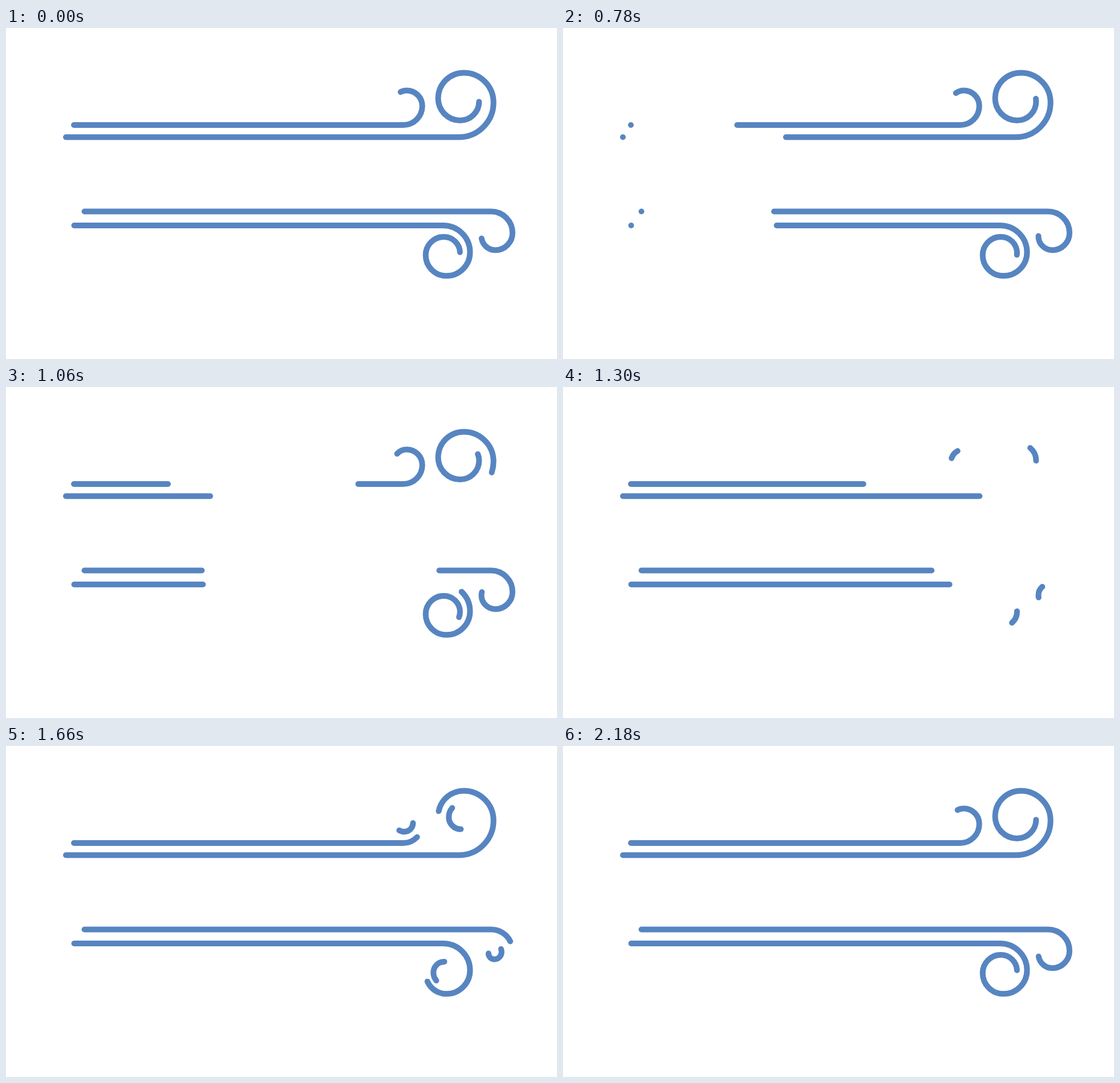
Recreate the animation shown at these times as an HTML page. Size 966 px wide and 580 px high, loop 3.58 s.

```html
<!DOCTYPE html>
<html>
<head>
<meta charset="utf-8">
<title>Wind</title>
<style>
  html, body { margin: 0; width: 100%; height: 100%; overflow: hidden; background: #fff; }
  svg { display: block; width: 966px; height: 580px; }
  path { fill: none; stroke: #5785c1; stroke-width: 10; stroke-linecap: round; }
</style>
</head>
<body>
<svg viewBox="0 0 966 580"></svg>
<script>
const LOOP = 3580, START = 500, END = 2180, STEP = 40;
const REST = 0.9; // the part of each path that is visible at rest
const svg = document.querySelector('svg');

// A straight line that curls up (side -1) or down (side 1) in ever smaller quarter circles.
function addGust({ x, y, curlX, side, radius, shrink, quarters }) {
  let d = `M${x} ${y}H${curlX}`;
  for (let i = 0; i < quarters; i++, radius *= shrink) {
    const dx = i % 4 === 0 || i % 4 === 3 ? radius : -radius;
    const dy = i % 4 < 2 ? radius : -radius;
    d += `a${radius} ${radius} 0 0 ${side > 0 ? 1 : 0} ${dx} ${dy * side}`;
  }
  const path = document.createElementNS('http://www.w3.org/2000/svg', 'path');
  path.setAttribute('d', d);
  path.setAttribute('pathLength', 1);
  svg.append(path);
}

addGust({ x: 119, y: 170, curlX: 696.5, side: -1, radius: 33.3, shrink: 0.82, quarters: 5 });
addGust({ x: 105, y: 191.3, curlX: 794, side: -1, radius: 60.7, shrink: 0.86, quarters: 8 });
addGust({ x: 137.5, y: 321.5, curlX: 850.5, side: 1, radius: 37.5, shrink: 0.805, quarters: 7 });
addGust({ x: 119.5, y: 346, curlX: 766.5, side: 1, radius: 47, shrink: 0.88, quarters: 8 });

const clamp = v => Math.min(1, Math.max(0, v));
const progress = (time, from, duration) => clamp((time - from) / duration);

function bezier(x1, y1, x2, y2) {
  const at = (a, b, s) => 3 * (1 - s) * (1 - s) * s * a + 3 * (1 - s) * s * s * b + s ** 3;
  return x => {
    let low = 0, high = 1;
    for (let i = 0; i < 24; i++) {
      const mid = (low + high) / 2;
      if (at(x1, x2, mid) < x) low = mid; else high = mid;
    }
    return at(y1, y2, high);
  };
}
const ease = bezier(0.25, 0.1, 0.25, 1);
const sweep = bezier(1 / 3, 0.06, 2 / 3, 0.85);
const easeOut = x => 1 - (1 - x) ** 1.4;

// The arriving gust spans 0..head; the leaving gust spans tail..front.
const head = t => t <= 310 ? 0 : REST * ease(progress(t, 310, 1420));
const tail = t => REST * sweep(progress(t, 0, 800)) + (1 - REST) * easeOut(progress(t, 800, 800));
function front(t) {
  const x = progress(t, 0, 1160);
  return REST + (1 - REST) * (0.19 * x + 0.81 * x ** 6);
}

function dashes(time) {
  if (time < START || time >= END) return `${REST} 2`;
  const t = Math.floor((time - START) / STEP) * STEP;
  const h = head(t), s = tail(t);
  return s >= 0.9999 ? `${h} 2` : `${h} ${s - h} ${front(t) - s} 2`;
}

function draw() {
  const pattern = dashes(performance.now() % LOOP);
  for (const path of svg.children) path.setAttribute('stroke-dasharray', pattern);
  requestAnimationFrame(draw);
}
draw();
</script>
</body>
</html>
```
